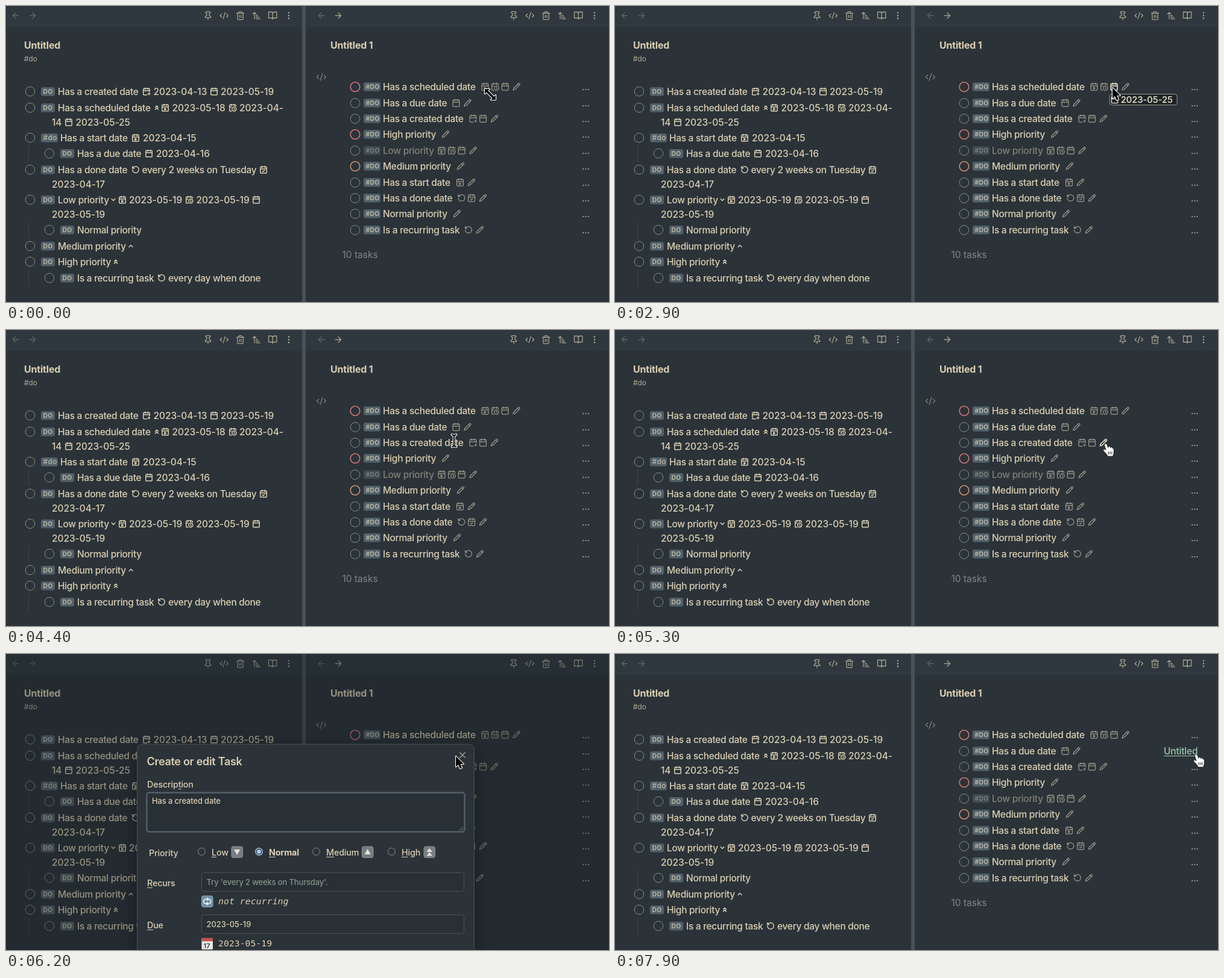
An HTML page with a canvas for the animation above (8 s loop, 1000 px wide and 492 px high).

```html
<!DOCTYPE html>
<html lang="en">
<head>
<meta charset="utf-8">
<title>Task list</title>
<style>
  html, body { margin: 0; width: 100%; height: 100%; overflow: hidden; background: #2b3339; }
  canvas { display: block; }
</style>
</head>
<body>
<canvas id="stage" width="1000" height="492"></canvas>
<script>
const ctx = document.getElementById('stage').getContext('2d');
const LOOP = 8000, STEP = 100;
const SANS = 'Inter, "Open Sans", sans-serif', MONO = '"DejaVu Sans Mono", monospace';
const C = {
  bg: '#2b3339', header: '#2f383e', divider: '#475258', text: '#dbceb1', icon: '#a8a291', dim: '#a29c8a',
  faint: '#5c6566', grey: '#7f8681', ring: '#858b87', guide: '#3e484d', badge: '#52616a',
  red: '#d9787a', orange: '#d99270', link: '#9cc7b0', bright: '#f3e8cd'
};

// Icon outlines on a 24-unit grid
const TABS = 'M16 2v4M8 2v4';
const BOX = 'M5 4h14a2 2 0 0 1 2 2v14a2 2 0 0 1-2 2H5a2 2 0 0 1-2-2V6a2 2 0 0 1 2-2zM3 10h18' + TABS;
const icons = {
  back: 'M19 12H5M12 19l-7-7 7-7',
  forward: 'M5 12h14M12 5l7 7-7 7',
  pin: 'M12 17v5M5 17h14v-1.8a2 2 0 0 0-1.1-1.8l-1.8-.9A2 2 0 0 1 15 10.8V6h1a2 2 0 0 0 0-4H8a2 2 0 0 0 0 4h1v4.8a2 2 0 0 1-1.1 1.7l-1.8.9A2 2 0 0 0 5 15.2z',
  code: 'M18 16l4-4-4-4M6 8l-4 4 4 4M14.5 4l-5 16',
  trash: 'M3 6h18M19 6v14a2 2 0 0 1-2 2H7a2 2 0 0 1-2-2V6M8 6V4a2 2 0 0 1 2-2h4a2 2 0 0 1 2 2v2M10 11v6M14 11v6',
  sort: 'M3 8l4-4 4 4M7 4v16M11 12h4M11 16h7M11 20h10',
  book: 'M2 3h6a4 4 0 0 1 4 4v14a3 3 0 0 0-3-3H2zM22 3h-6a4 4 0 0 0-4 4v14a3 3 0 0 1 3-3h7z',
  more: 'M11 5a1 1 0 1 0 2 0a1 1 0 1 0-2 0M11 12a1 1 0 1 0 2 0a1 1 0 1 0-2 0M11 19a1 1 0 1 0 2 0a1 1 0 1 0-2 0',
  due: BOX,
  done: BOX + 'M9 16l2 2 4-4',
  start: BOX + 'M10 13.5l4.5 2.7-4.5 2.7z',
  created: 'M21 13V6a2 2 0 0 0-2-2H5a2 2 0 0 0-2 2v14a2 2 0 0 0 2 2h8M3 10h18M19 16v6M16 19h6' + TABS,
  scheduled: 'M21 7.5V6a2 2 0 0 0-2-2H5a2 2 0 0 0-2 2v14a2 2 0 0 0 2 2h3.5M3 10h5M17.5 17.5L16 16.2V14M22 16a6 6 0 1 1-12 0a6 6 0 0 1 12 0z' + TABS,
  repeat: 'M3 12a9 9 0 1 0 9-9a9.8 9.8 0 0 0-6.7 2.7L3 8M3 3v5h5',
  high: 'M17 11l-5-5-5 5M17 18l-5-5-5 5',
  medium: 'M18 15l-6-6-6 6',
  low: 'M6 9l6 6 6-6',
  pencil: 'M17 3a2.8 2.8 0 1 1 4 4L7.5 20.5L2 22l1.5-5.5zM15 5l4 4',
  close: 'M18 6L6 18M6 6l12 12'
};
for (const name in icons) icons[name] = new Path2D(icons[name]);

const cursors = {
  arrow: new Path2D('M0 0V17.5L4 13.8L6.8 20.4L10 19L7.3 12.7H12.8Z'),
  beam: new Path2D('M-4-11L0-10L4-11V-9L1-8V8L4 9V11L0 10L-4 11V9L-1 8V-8L-4-9Z'),
  resize: new Path2D('M-9-9H-1L-3.7-6.3L6.3 3.7L9 1V9H1L3.7 6.3L-6.3-3.7L-9-1Z'),
  hand: new Path2D('M-2 1C-3-2 1-3 2 0L4.2 6C5-.5 8 4 8 6C9 3 11 4 11.3 6.4C13 5 14 7 14 9V14C14 16 13 17 12.5 20H3.5C2 16-1 14-4 10.5C-5.5 8-2.5 7 .5 10Z')
};

function text(str, x, y, { size = 15.5, weight = 500, color = C.text, spacing = /^\d{4}/.test(str) ? -.06 : -.3, font = SANS, style = '' } = {}) {
  ctx.font = `${style} ${weight} ${size}px ${font}`;
  ctx.letterSpacing = spacing + 'px';
  ctx.fillStyle = color;
  ctx.fillText(str, x, y);
}

function icon(name, x, y, color = C.text, size = 16, width = 1.3) {
  ctx.save();
  ctx.translate(x - size / 2, y - size / 2);
  ctx.scale(size / 24, size / 24);
  ctx.lineWidth = width * 24 / size;
  ctx.lineCap = ctx.lineJoin = 'round';
  ctx.strokeStyle = color;
  ctx.stroke(icons[name]);
  ctx.restore();
}

function box(x, y, w, h, r, fill, stroke, width = 1) {
  ctx.beginPath();
  ctx.roundRect(x, y, w, h, r);
  if (fill) { ctx.fillStyle = fill; ctx.fill(); }
  if (stroke) { ctx.strokeStyle = stroke; ctx.lineWidth = width; ctx.stroke(); }
}

function ring(x, y, color = C.ring, width = 1, r = 7.8) {
  ctx.beginPath();
  ctx.arc(x, y, r, 0, 2 * Math.PI);
  ctx.strokeStyle = color;
  ctx.lineWidth = width;
  ctx.stroke();
}

function badge(label, x, y) {
  box(x, y - 7, label.length > 2 ? 28 : 23, 14.5, 3, C.badge);
  text(label, x + 3.5, y + 4, { size: label === '#do' ? 12 : 10.3, weight: label === '#do' ? 500 : 700, color: '#bab5a3', spacing: .3 });
}

// Left note: each line holds [x, text or icon name] parts; indented lines start at 32
const noteLines = [
  { y: 142, badge: 'DO', parts: [[86, 'Has a created date'], [233, 'created'], [244.5, '2023-04-13'], [345, 'due'], [356, '2023-05-19']] },
  { y: 169, badge: 'DO', parts: [[86, 'Has a scheduled date'], [250, 'high'], [264, 'start'], [275.5, '2023-05-18'], [376, 'scheduled'], [387, '2023-04-']] },
  { y: 193, parts: [[76, '14'], [104, 'due'], [115.5, '2023-05-25']] },
  { y: 219, badge: '#do', parts: [[90, 'Has a start date'], [215, 'start'], [227, '2023-04-15']] },
  { y: 245, badge: 'DO', indent: 32, parts: [[118, 'Has a due date'], [237, 'due'], [249, '2023-04-16']] },
  { y: 272, badge: 'DO', parts: [[86, 'Has a done date'], [215, 'repeat'], [225.5, 'every 2 weeks on Tuesday'], [427, 'done']] },
  { y: 296, parts: [[76, '2023-04-17']] },
  { y: 322, badge: 'DO', parts: [[86, 'Low priority'], [178, 'low'], [193, 'start'], [204, '2023-05-19'], [304, 'scheduled'], [315.5, '2023-05-19'], [415, 'due']] },
  { y: 346, parts: [[76, '2023-05-19']] },
  { y: 372, badge: 'DO', indent: 32, parts: [[118, 'Normal priority']] },
  { y: 399, badge: 'DO', parts: [[86, 'Medium priority'], [207, 'medium']] },
  { y: 425, badge: 'DO', parts: [[86, 'High priority'], [182, 'high']] },
  { y: 452, badge: 'DO', indent: 32, parts: [[118, 'Is a recurring task'], [258, 'repeat'], [269, 'every day when done']] }
];

// Right list: the icons start at x and end with a pencil
const tasks = [
  { name: 'Has a scheduled date', x: 794.5, icons: ['start', 'scheduled', 'due'], dates: ['2023-05-18', '2023-04-14', '2023-05-25'], color: C.red },
  { name: 'Has a due date', x: 746.5, icons: ['due'], dates: ['2023-04-16'] },
  { name: 'Has a created date', x: 774.5, icons: ['created', 'due'], dates: ['2023-04-13', '2023-05-19'] },
  { name: 'High priority', x: 726.6, icons: [], color: C.red },
  { name: 'Low priority', x: 722.5, icons: ['start', 'scheduled', 'due'], faded: true },
  { name: 'Medium priority', x: 751.6, icons: [], color: C.orange },
  { name: 'Has a start date', x: 753, icons: ['start'] },
  { name: 'Has a done date', x: 755.5, icons: ['repeat', 'done'] },
  { name: 'Normal priority', x: 745.6, icons: [] },
  { name: 'Is a recurring task', x: 767, icons: ['repeat'] }
].map((task, i) => ({ ...task, y: Math.round(134.2 + i * 26.4) }));

// Pointer path: time, hot spot, shape
const path = [
  [0, 803, 147, 'resize'], [300, 805, 148, 'arrow'], [600, 812, 151, 'arrow'], [900, 800, 143, 'arrow'],
  [1000, 798, 135, 'arrow'], [1800, 798, 134, 'arrow'], [1900, 812, 135, 'arrow'], [2400, 812, 135, 'arrow'],
  [2500, 822, 136, 'arrow'], [2900, 825, 136, 'arrow'], [3500, 827, 138, 'arrow'], [3700, 838, 147, 'arrow'],
  [4200, 748, 182, 'beam'], [4400, 743, 184, 'beam'], [4700, 760, 199, 'arrow'], [4900, 790, 203, 'arrow'],
  [5200, 814, 191, 'hand'], [5500, 814, 191, 'arrow'], [6100, 746, 170, 'arrow'], [6600, 747, 170, 'arrow'],
  [7100, 972, 165, 'hand'], [7400, 974, 165, 'hand'], [7800, 964, 169, 'hand'], [8000, 964, 169, 'hand']
];

function pointerAt(t) {
  const i = path.findIndex(key => key[0] > t);
  const [t0, x0, y0, shape] = path[i - 1], [t1, x1, y1] = path[i];
  const p = (t - t0) / (t1 - t0), e = p * p * (3 - 2 * p);
  return { x: x0 + (x1 - x0) * e, y: y0 + (y1 - y0) * e, shape };
}

function drawPointer({ x, y, shape }) {
  const light = shape === 'hand';
  ctx.save();
  ctx.translate(x, y);
  if (light) ctx.scale(.92, .92);
  ctx.lineJoin = 'round';
  ctx.fillStyle = light ? '#fff' : '#000';
  ctx.strokeStyle = light ? '#000' : '#fff';
  ctx.lineWidth = light ? 1.2 : 2.2;
  ctx.stroke(cursors[shape]);
  ctx.fill(cursors[shape]);
  if (light) {
    ctx.lineWidth = 1;
    for (const line of [4.7, 7.7, 10.7]) {
      ctx.beginPath(); ctx.moveTo(line, 12); ctx.lineTo(line, 17); ctx.stroke();
    }
  }
  ctx.restore();
}

function drawPane(x, canGoForward) {
  icon('back', x + 16, 16, C.faint);
  icon('forward', x + 44, 16, canGoForward ? C.icon : C.faint);
  ['pin', 'code', 'trash', 'sort', 'book', 'more'].forEach((name, i) => icon(name, x + 335 + i * 26.8, 16, C.icon, 16));
}

function drawNote() {
  text('Untitled', 30, 71, { size: 16, weight: 650, spacing: -.2 });
  text('#do', 30, 92, { size: 11.8, weight: 400, color: '#b5ac96', spacing: 0 });
  ctx.fillStyle = C.guide;
  for (const y of [232, 359, 439]) ctx.fillRect(37, y, 1, 27);
  for (const { y, badge: label, indent = 0, parts } of noteLines) {
    if (label) {
      ring(40 + indent, y);
      badge(label, 58 + indent, y);
    }
    for (const [x, part] of parts) {
      if (icons[part]) icon(part, x, y, C.text, /high|medium|low/.test(part) ? 11.5 : 14, 1.5);
      else text(part, x, y + 6);
    }
  }
}

function drawTasks(pointer) {
  let tip;
  text('Untitled 1', 538, 71, { size: 16, weight: 650, spacing: -.2 });
  icon('code', 523, 118, C.grey, 18, 1.2);
  for (const task of tasks) {
    const { y } = task;
    ring(579, y + .4, task.color, task.color ? 1.5 : 1);
    ctx.globalAlpha = task.faded ? .5 : 1;
    badge('#DO', 593, y);
    text(task.name, 625, y + 6);
    ctx.globalAlpha = 1;

    [...task.icons, 'pencil'].forEach((name, i) => {
      const x = task.x + i * 16.6 + (name === 'pencil' ? 2.4 : 0);
      const hovered = pointer && Math.abs(pointer.x - x) < 8.3 && Math.abs(pointer.y - y) < 8;
      icon(name, x, y, hovered ? C.bright : C.dim, name === 'pencil' ? 13.5 : 14.5, hovered ? 1.5 : 1.2);
      if (hovered && task.dates?.[i]) tip = { x, y, name, date: task.dates[i] };
    });

    if (pointer && pointer.x > 950 && Math.abs(pointer.y - y) < 11) {
      text('Untitled', 910, y + 6, { color: C.link, spacing: -.2 });
      ctx.fillRect(910, y + 8, 57, 1);
    } else {
      text('...', 955, y + 6, { color: '#b5ac96', size: 15 });
    }
  }
  text('10 tasks', 557.5, 419, { color: C.grey, weight: 400, spacing: 0 });
  if (tip) {
    box(tip.x - 7.5, tip.y + 12.5, 112, 18, 4, '#1e2529', '#a39c88');
    icon(tip.name, tip.x + 1, tip.y + 21.5, C.bright, 14);
    text(tip.date, tip.x + 11, tip.y + 27, { size: 14.8, weight: 450, color: C.bright });
  }
}

// Label with one underlined access-key letter
function label(str, x, y, key = 0, weight = 500) {
  text(str, x, y, { size: 14.3, weight, spacing: -.15 });
  const left = ctx.measureText(str.slice(0, key)).width;
  ctx.fillRect(x + left, y + 2, ctx.measureText(str[key]).width, 1);
}

function polygon(points, color) {
  ctx.beginPath();
  for (const [x, y] of points) ctx.lineTo(x, y);
  ctx.fillStyle = color;
  ctx.fill();
}

function priorityButton(x, kind) {
  box(x, 320, 18.5, 18.5, 3, '#777d80', '#8b9092');
  const cx = x + 9.2;
  const triangle = (base, tip) => polygon([[cx - 5, base], [cx + 5, base], [cx, tip]], '#e3e3df');
  if (kind === 'low') triangle(325, 334);
  if (kind === 'medium') triangle(333, 324);
  if (kind === 'high') { triangle(329, 323); triangle(335.5, 329.5); }
}

function drawDialog() {
  ctx.fillStyle = 'rgba(22, 29, 33, .35)';
  ctx.fillRect(0, 0, 1000, 492);
  ctx.save();
  ctx.shadowColor = 'rgba(0, 0, 0, .35)';
  ctx.shadowBlur = 28;
  ctx.shadowOffsetY = 8;
  box(217.5, 150, 559, 400, 9, C.bg);
  ctx.restore();
  box(217.5, 150, 559, 400, 9, null, '#475258');
  icon('close', 757, 168, C.icon, 17, 1.4);
  text('Create or edit Task', 233.5, 185, { size: 18, weight: 600 });

  const small = { size: 12.9, weight: 450, spacing: -.1 };
  label('Description', 234, 222, 7);
  box(233.5, 230.5, 527, 65, 4, '#283035', '#536069', 2.4);
  text('Has a created date', 242, 249, small);
  ctx.strokeStyle = C.ring;
  ctx.lineWidth = 1;
  ctx.beginPath();
  ctx.moveTo(752, 293); ctx.lineTo(758, 287);
  ctx.moveTo(756, 293); ctx.lineTo(758, 291);
  ctx.stroke();

  text('Priority', 237, 336, { size: 14.3, spacing: -.15 });
  [['Low', 324.5, 341, 374], ['Normal', 419.5, 436], ['Medium', 514.5, 531, 590.5], ['High', 639.5, 656, 693]]
    .forEach(([name, radio, x, button]) => {
      const checked = !button;
      if (checked) {
        ring(radio, 328.5, '#a9c8ee', 1.4, 5.8);
        ctx.beginPath();
        ctx.arc(radio, 328.5, 3.6, 0, 7);
        ctx.fillStyle = '#a9cbf7';
        ctx.fill();
      } else {
        ring(radio, 328.5, C.ring, 1, 6);
        priorityButton(button, name.toLowerCase());
      }
      label(name, x, 335, 0, checked ? 700 : 500);
    });

  label('Recurs', 234, 386);
  box(324.5, 363.5, 435, 31, 4, '#283035', C.divider);
  text("Try 'every 2 weeks on Thursday'.", 332.5, 384, { ...small, color: '#859289' });
  box(324.5, 402, 18.5, 18.5, 3, '#6d8ea6', '#8facc0');
  box(328, 407.5, 11.5, 7.5, 3, null, '#eef2f4', 1.6);
  polygon([[333, 404.5], [337.5, 407.5], [333, 410.5]], '#eef2f4');
  polygon([[335, 412], [330.5, 415], [335, 418]], '#eef2f4');
  text('not recurring', 352, 416, { size: 14.9, weight: 400, font: MONO, style: 'italic', spacing: 0 });

  label('Due', 234, 456);
  box(324.5, 433.5, 435, 31, 4, '#283035', C.divider);
  text('2023-05-19', 332.5, 454, { ...small, spacing: 0 });
  box(324.5, 472, 18.5, 19, 1, '#e9e7e2');
  ctx.fillStyle = '#c0534b';
  ctx.fillRect(324.5, 472, 18.5, 5.5);
  text('17', 327.5, 488.5, { size: 11, weight: 600, color: '#3b3f42', spacing: 0 });
  text('2023-05-19', 352, 486, { size: 14.8, weight: 400, font: MONO, spacing: 0 });
}

function draw(t) {
  const pointer = pointerAt(t), dialogOpen = t >= 5400 && t < 6500;
  ctx.fillStyle = C.bg;
  ctx.fillRect(0, 0, 1000, 492);
  ctx.fillStyle = C.header;
  ctx.fillRect(0, 0, 1000, 35);
  ctx.fillStyle = C.divider;
  ctx.fillRect(491, 0, 6, 492);
  drawPane(0, false);
  drawPane(507, true);
  drawNote();
  drawTasks(dialogOpen ? null : pointer);
  if (dialogOpen) drawDialog();
  drawPointer(pointer);
}

function tick() {
  draw(Math.floor(performance.now() % LOOP / STEP) * STEP);
  requestAnimationFrame(tick);
}
tick();
</script>
</body>
</html>
```
